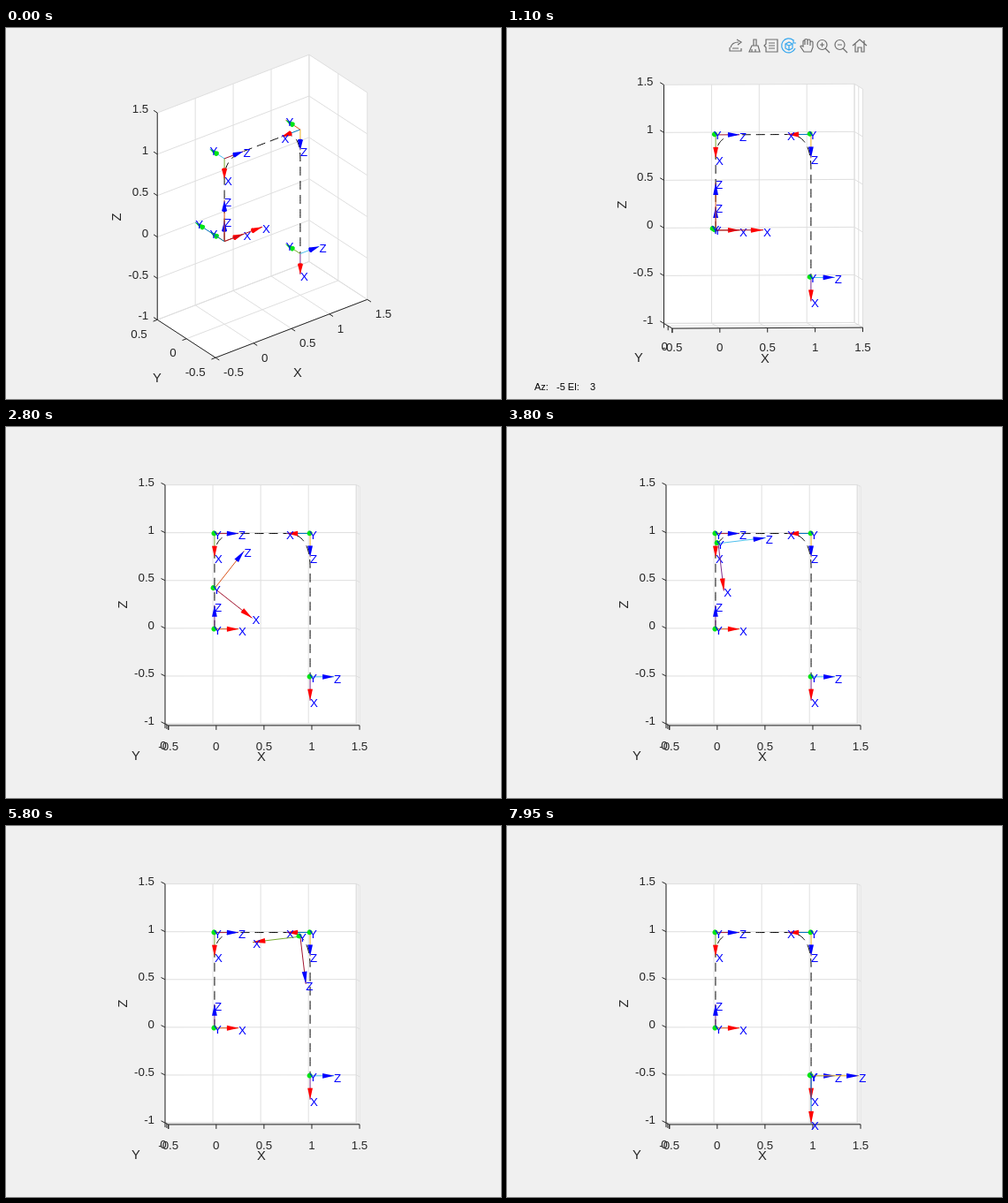
These frames come from a looping animation (560 by 420 pixels, 8 s). An HTML page with a canvas:

```html
<!DOCTYPE html>
<html lang="en">
<head>
<meta charset="utf-8">
<title>Frame moving through waypoints</title>
<style>
html, body { margin: 0; width: 100%; height: 100%; overflow: hidden; background: #f0f0f0; }
canvas { display: block; }
</style>
</head>
<body>
<canvas id="stage" width="560" height="420"></canvas>
<script>
const ctx = document.getElementById('stage').getContext('2d');
const LOOP = 8000, STEP = 50, MOVE_START = 1950, LEG = 2000;
const SCALE = 108.2, CX = 290, CY = 201.7;
const FONT = '"Liberation Sans", Arial, sans-serif';
const INK = '#262626';
const COLORS = ['#0072bd', '#d95319', '#edb120', '#7e2f8e', '#77ac30', '#4dbeee', '#a2142f'];
const X_TICKS = [-0.5, 0, 0.5, 1, 1.5], Y_TICKS = [-0.5, 0, 0.5], Z_TICKS = [-1, -0.5, 0, 0.5, 1, 1.5];
const POINTS = [[0, 0, 0], [0, 0, 1], [1, 0, 1], [1, 0, -0.5]];
const TURNS = [0, 90, 180, 90];
const BLEND = 0.24;

// time, azimuth, elevation, then the centres of the X, Y and Z axis titles
const VIEWS = [
  [0, -37.5, 30, 330, 390, 171, 396, 125, 214],
  [250, -37.5, 30, 330, 390, 171, 396, 125, 214],
  [650, -25, 20, 314, 387, 153, 387, 121, 201],
  [850, -22, 17, 311, 385, 152, 385, 122, 201],
  [1100, -5, 3, 292, 374, 149, 373, 130, 200],
  [1400, -2, 1, 289, 373, 147, 372, 132, 201]
];

let right, up, away;

const mix = (a, b, u) => a.map((v, i) => v + (b[i] - v) * u);
const dot = (a, b) => a[0] * b[0] + a[1] * b[1] + a[2] * b[2];

function viewAt(t) {
  const i = VIEWS.findIndex(v => v[0] > t);
  if (i < 0) return VIEWS[VIEWS.length - 1];
  const a = VIEWS[i - 1], b = VIEWS[i];
  return mix(a, b, (t - a[0]) / (b[0] - a[0]));
}

function setCamera(az, el) {
  const r = Math.PI / 180, sa = Math.sin(az * r), ca = Math.cos(az * r);
  const se = Math.sin(el * r), ce = Math.cos(el * r);
  right = [ca, sa, 0];
  up = [-se * sa, se * ca, ce];
  away = [-ce * sa, ce * ca, -se];
}

function project(x, y, z) {
  const p = [x - 0.5, y, z - 0.25];
  return [CX + SCALE * dot(p, right), CY - SCALE * dot(p, up)];
}

function screenDir(v) {
  const x = dot(v, right), y = -dot(v, up), n = Math.hypot(x, y) || 1;
  return [x / n, y / n];
}

function trace(points, close) {
  ctx.beginPath();
  points.forEach(p => ctx.lineTo(p[0], p[1]));
  if (close) ctx.closePath();
}

function line(a, b, color, width = 1) {
  ctx.strokeStyle = color;
  ctx.lineWidth = width;
  trace([a, b]);
  ctx.stroke();
}

function text(s, x, y, align = 'center', size = 13.3, color = INK) {
  ctx.font = size + 'px ' + FONT;
  ctx.textAlign = align;
  ctx.textBaseline = 'alphabetic';
  ctx.fillStyle = color;
  ctx.fillText(s, x, y + size * 0.36);
}

function drawWalls() {
  const walls = [
    [[-0.5, -0.5, -1], [1.5, -0.5, -1], [1.5, 0.5, -1], [-0.5, 0.5, -1]],
    [[-0.5, 0.5, -1], [1.5, 0.5, -1], [1.5, 0.5, 1.5], [-0.5, 0.5, 1.5]],
    [[1.5, -0.5, -1], [1.5, 0.5, -1], [1.5, 0.5, 1.5], [1.5, -0.5, 1.5]]
  ];
  ctx.fillStyle = '#fff';
  for (const w of walls) {
    trace(w.map(p => project(...p)), true);
    ctx.fill();
  }
  const grid = (...p) => {
    ctx.strokeStyle = '#dfdfdf';
    ctx.lineWidth = 1;
    trace(p.map(q => project(...q)));
    ctx.stroke();
  };
  X_TICKS.forEach(x => grid([x, -0.5, -1], [x, 0.5, -1], [x, 0.5, 1.5]));
  Y_TICKS.forEach(y => grid([-0.5, y, -1], [1.5, y, -1], [1.5, y, 1.5]));
  Z_TICKS.forEach(z => grid([-0.5, 0.5, z], [1.5, 0.5, z], [1.5, -0.5, z]));
}

function drawAxes(view) {
  const el = view[2], flat = el < 10;
  const tick = (p, d) => line(p, [p[0] + 5 * d[0], p[1] + 5 * d[1]], INK);
  const corner = project(-0.5, -0.5, -1), back = project(-0.5, 0.5, -1);
  line(corner, project(1.5, -0.5, -1), INK);
  line(corner, back, INK);
  line(back, project(-0.5, 0.5, 1.5), INK);

  for (const x of X_TICKS) {
    const p = project(x, -0.5, -1);
    tick(p, flat ? [0, 1] : screenDir([0, -1, 0]));
    if (flat) text(x, p[0], 361);
    else text(x, p[0] + 9, p[1] + 16, el > 25 ? 'left' : 'center');
  }
  for (const y of Y_TICKS) {
    const p = project(-0.5, y, -1);
    tick(p, flat ? [0, 1] : screenDir([-1, 0, 0]));
    if (!flat) text(y, p[0] - 11.5, p[1] + 11 + Math.max(0, el - 20) * 0.45, 'right');
    else if (y === 0) text(y, p[0] - 4, 360);
  }
  const zDir = screenDir([0, 1, 0]);
  for (const z of Z_TICKS) {
    const p = project(-0.5, 0.5, z);
    tick(p, zDir);
    text(z, p[0] - (flat ? 12 : 10), p[1] + zDir[1] * 8.5, 'right');
  }

  text('X', view[3], view[4], 'center', 14.7);
  text('Y', view[5], view[6], 'center', 14.7);
  ctx.save();
  ctx.translate(view[7], view[8]);
  ctx.rotate(-Math.PI / 2);
  text('Z', 0, 0, 'center', 14.7);
  ctx.restore();
}

// position along the legs, with a parabola rounding each inner corner
function positionAt(f) {
  const onLeg = (i, u) => mix(POINTS[i], POINTS[i + 1], u);
  const k = Math.round(f), d = f - k;
  if ((k === 1 || k === 2) && Math.abs(d) < BLEND) {
    const u = (d + BLEND) / (2 * BLEND);
    const a = onLeg(k - 1, 1 - BLEND), b = POINTS[k], c = onLeg(k, BLEND);
    return mix(mix(a, b, u), mix(b, c, u), u);
  }
  const i = Math.min(2, Math.floor(f));
  return onLeg(i, f - i);
}

function drawPath() {
  const pts = [];
  for (let i = 0; i <= 150; i++) pts.push(project(...positionAt(i / 50)));
  ctx.strokeStyle = '#000';
  ctx.lineWidth = 1;
  ctx.setLineDash([10, 6]);
  trace(pts);
  ctx.stroke();
  ctx.setLineDash([]);
}

function drawCone(tip, v, length, color) {
  const k = length, x = dot(v, right), y = -dot(v, up);
  const bx = tip[0] - k * x, by = tip[1] - k * y;
  const d = screenDir(v), r = 2.9;
  ctx.fillStyle = color;
  trace([tip, [bx - d[1] * r, by + d[0] * r], [bx + d[1] * r, by - d[0] * r]], true);
  ctx.fill();
  ctx.beginPath();
  ctx.ellipse(bx, by, r * Math.abs(dot(v, away)), r, Math.atan2(d[1], d[0]), 0, 7);
  ctx.fill();
}

function drawFrame(pos, degrees, size, firstColor) {
  const a = degrees * Math.PI / 180, c = Math.cos(a), s = Math.sin(a);
  const arms = [
    ['X', [c, 0, -s], '#f00', 0],
    ['Z', [s, 0, c], '#00f', 2],
    ['Y', [0, 1, 0], '#00e515', 1]
  ];
  const from = project(...pos);
  const tips = arms.map(([, v]) => project(...pos.map((p, i) => p + v[i] * size)));
  arms.forEach(([, , , n], i) => line(from, tips[i], COLORS[(firstColor + n) % 7]));
  arms.forEach(([, v, color], i) => drawCone(tips[i], v, size > 0.3 ? 14 : 13, color));
  arms.forEach(([name], i) => text(name, tips[i][0], tips[i][1] + 2, 'left', 13.3, '#00f'));
}

// icons on a 16 px square centred on the given x
const ICONS = [
  [259, 'M-7 2V6H6V3M-6 2C-5-2-2-4 3-4M1-7L6-4L2-1M-4 3H3'],
  [280, 'M-1-7H2V0H-1ZM-3 0H4L6 7H-6ZM-3 4V7M1 4V7'],
  [299, 'M-6-7H7V7H-6V2L-8 0L-6-2ZM-3-3H4M-3 0H4M-3 3H4'],
  [319, 'M-4-2L0-4L4-2V3L0 5L-4 3ZM-4-2L0 0L4-2M0 0V5M5-6A8 8 0 1 0 7 3M5-7V-3H8'],
  [339, 'M-3 7L-7 1Q-7-1-4 1V-5Q-3-7-2-5V-1V-7Q-1-8 1-7V-1V-6Q3-8 4-6V0V-4Q6-6 7-4V2L5 7Z'],
  [358, 'M4-1A5.5 5.5 0 1 1-7-1A5.5 5.5 0 1 1 4-1M2 3L7 8M-4-1H1M-1.5-3.5V1.5'],
  [378, 'M4-1A5.5 5.5 0 1 1-7-1A5.5 5.5 0 1 1 4-1M2 3L7 8M-4-1H1'],
  [399, 'M-8 0L0-7L8 0M-5-2V7H-2V2H2V7H5V-2M5-6V-3']
].map(([x, d]) => [x, new Path2D(d)]);

function drawToolbar() {
  ICONS.forEach(([x, path], i) => {
    ctx.save();
    ctx.translate(x, 20);
    ctx.strokeStyle = i === 3 ? '#35a7ee' : '#6e6e6e';
    ctx.lineWidth = 1.2;
    ctx.stroke(path);
    ctx.restore();
  });
}

function drawReadout(az, el) {
  const pad = v => String(Math.round(v)).padStart(4);
  text(`Az: ${pad(az)} El: ${pad(el)}`, 65.5, 406, 'center', 11, '#000');
}

function draw(t) {
  const n = Math.floor(t / STEP), time = n * STEP;
  const view = viewAt(time);
  const f = Math.min(3, Math.max(0, (time - MOVE_START) / LEG));
  ctx.fillStyle = '#f0f0f0';
  ctx.fillRect(0, 0, 560, 420);
  setCamera(view[1], view[2]);
  drawWalls();
  drawAxes(view);
  drawPath();
  POINTS.forEach((p, i) => drawFrame(p, TURNS[i], 0.25, 1 + 3 * i));
  const shade = time < MOVE_START ? 6 : (6 + 3 * n) % 7;
  drawFrame(positionAt(f), 90 * (f < 2 ? f : 4 - f), 0.5, shade);
  if (time >= 100 && time < 1900) drawToolbar();
  if (time >= 250 && time < 1800) drawReadout(view[1], view[2]);
}

const start = performance.now();
function tick() {
  draw((performance.now() - start) % LOOP);
  requestAnimationFrame(tick);
}
tick();
</script>
</body>
</html>
```
